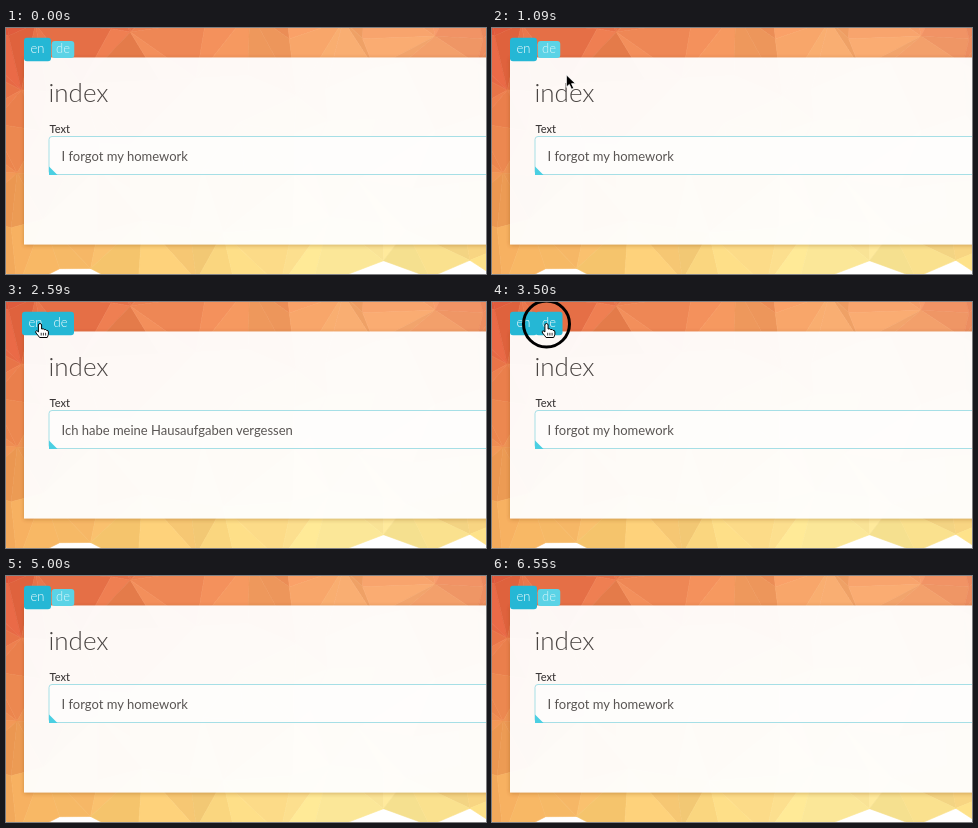
Animation of 480 by 246 pixels, one loop 6.6 s. Source, as an HTML page:

```html
<!DOCTYPE html>
<html lang="en">
<head>
<meta charset="utf-8">
<title>Language switch</title>
<style>
  html, body { margin: 0; width: 100%; height: 100%; overflow: hidden; }
  svg { display: block; width: 100vw; height: 100vh; font-family: Lato, "Open Sans", sans-serif; }
</style>
</head>
<body>
<svg viewBox="0 0 480 246" preserveAspectRatio="none">
  <defs>
    <filter id="shadow" x="-5%" y="-5%" width="110%" height="115%">
      <feDropShadow dx="0" dy="1" stdDeviation="2" flood-color="#7a3a10" flood-opacity=".35"/>
    </filter>
  </defs>
  <g id="facets"></g>
  <rect x="18" y="29.5" width="480" height="187" fill="#fff" filter="url(#shadow)" opacity=".95"/>
  <text x="42.5" y="74" font-size="26" font-weight="300" fill="#4a4543">index</text>
  <text x="43.5" y="105" font-size="11" font-weight="500" fill="#3c3838">Text</text>
  <rect x="43" y="108.5" width="460" height="38" rx="3" fill="#fff" fill-opacity=".6" stroke="#a6dfe6"/>
  <path d="M43 138.5V147H51.5Z" fill="#4bcfe2"/>
  <text id="sentence" x="55.5" y="133" font-size="13" fill="#595553"></text>
  <g id="tabs" font-size="13" font-weight="300" fill="#fff" text-anchor="middle"></g>
  <circle id="ring" r="23" fill="none" stroke="#000" stroke-width="3"/>
  <path id="arrow" d="M0 0V12.5L3 9.8L5.2 14.6L7.5 13.6L5.3 9H9.3Z" fill="#000" stroke="#fff" stroke-width=".9"/>
  <g id="hand" fill="#fff" stroke="#000" stroke-linejoin="round">
    <path d="M-1.6 8V1Q-1.4 -.5 0 -.5T1.6 1V5Q3.7 4.2 4.2 5.6Q6 5 6.5 6.4Q8.4 6 8.4 8V10.2Q8 12 7.2 13.5H-.4Q-2 11.2-4 9Q-5 7.2-3.5 6.8Q-2.4 7-1.6 8Z"/>
    <path d="M1.2 8.8V11.5M3.4 8.8V11.5M5.6 8.8V11.5" stroke-width=".8"/>
  </g>
</svg>
<script>
const LOOP = 6600;
const SVG = 'http://www.w3.org/2000/svg';
const byId = id => document.getElementById(id);
const sentences = { en: 'I forgot my homework', de: 'Ich habe meine Hausaufgaben vergessen' };

function add(parent, tag, attrs) {
  const node = parent.appendChild(document.createElementNS(SVG, tag));
  setAttrs(node, attrs);
  return node;
}
function setAttrs(node, attrs) {
  for (const name in attrs) node.setAttribute(name, attrs[name]);
}
const show = (node, visible) => node.setAttribute('visibility', visible ? 'visible' : 'hidden');

// Low-poly backdrop: a jittered grid coloured from two gradients.
const topStops = [[226, 92, 62], [233, 118, 76], [241, 143, 88], [245, 164, 106], [240, 143, 100]];
const bottomStops = [[247, 182, 97], [249, 204, 114], [251, 222, 134], [253, 242, 162], [249, 224, 134]];
const mix = (a, b, k) => a.map((v, i) => v + (b[i] - v) * k);
const clamp = v => Math.max(0, Math.min(1, v));
function sample(stops, k) {
  const p = clamp(k) * (stops.length - 1);
  const i = Math.min(Math.floor(p), stops.length - 2);
  return mix(stops[i], stops[i + 1], p - i);
}
let seed = 11;
const random = () => (seed = seed * 16807 % 2147483647) / 2147483647;

function drawFacets() {
  const cols = 13, rows = 7;
  const point = (c, r) => [(c - 1) * 46 + (random() - .5) * 34, (r - 1) * 50 + (random() - .5) * 36];
  const grid = Array.from({ length: rows }, (_, r) => Array.from({ length: cols }, (_, c) => point(c, r)));
  const facet = (...pts) => {
    const [x, y] = [0, 1].map(i => pts.reduce((sum, p) => sum + p[i], 0) / 3);
    const shade = (random() - .5) * 16;
    const base = mix(sample(topStops, x / 480), sample(bottomStops, x / 480), clamp(y / 246));
    const fill = `rgb(${base.map(v => Math.round(Math.min(255, v + shade)))})`;
    add(byId('facets'), 'polygon', { points: pts.join(' '), fill, stroke: fill, 'stroke-width': .6 });
  };
  for (let r = 0; r < rows - 1; r++) {
    for (let c = 0; c < cols - 1; c++) {
      const [a, b, d, e] = [grid[r][c], grid[r][c + 1], grid[r + 1][c], grid[r + 1][c + 1]];
      if ((r + c) % 2) { facet(a, b, e); facet(a, e, d); }
      else { facet(a, b, d); facet(b, e, d); }
    }
  }
}

const tabs = ['de', 'en'].map(lang => {
  const box = add(byId('tabs'), 'rect', { rx: 3 });
  const label = add(byId('tabs'), 'text', { y: 25 });
  label.textContent = lang;
  return { lang, box, label };
});

// Each click shows the ring and flips the language when it ends.
const clicks = [[1600, 1750], [2620, 2720], [3450, 3600], [4400, 4540]];

const easeOut = k => 1 - (1 - k) ** 2.2;
const easeIn = k => k ** 2.2;
const smooth = k => k * k * (3 - 2 * k);
const moves = [
  { start: 600, end: 1350, from: [260, 269], to: [54.5, 23], ease: easeOut },
  { start: 1950, end: 2200, to: [34, 22], ease: smooth },
  { start: 2850, end: 3150, to: [54.5, 22], ease: smooth },
  { start: 3800, end: 4050, to: [34, 24.5], ease: smooth },
  { start: 4620, end: 4960, to: [230, 270], ease: easeIn }
];

function cursorAt(t) {
  let pos = moves[0].from;
  for (const { start, end, to, ease } of moves) {
    if (t < start) break;
    pos = mix(pos, to, ease(clamp((t - start) / (end - start))));
  }
  return pos;
}

function drawTab({ lang, box, label }, selected, hovered) {
  const big = selected || hovered;
  const center = lang === 'en' ? (selected ? 31.5 : 29.5) : (selected ? 54.5 : 57);
  const [w, h] = big ? [27, 23.5] : [22.5, 17];
  setAttrs(box, {
    x: center - w / 2, y: 21.5 - h / 2, width: w, height: h,
    fill: big ? '#25b7d5' : '#5bd3e6'
  });
  setAttrs(label, { x: center, 'fill-opacity': big ? 1 : .8 });
}

function render(t) {
  const [x, y] = cursorAt(t);
  const selected = clicks.filter(([, end]) => t >= end).length % 2 ? 'de' : 'en';
  const overTabs = y < 33 && x > 16 && x < 71;
  const hovered = overTabs ? (x < 43 ? 'en' : 'de') : '';

  tabs.forEach(tab => drawTab(tab, tab.lang === selected, tab.lang === hovered));
  byId('sentence').textContent = sentences[selected];

  for (const id of ['arrow', 'hand', 'ring']) byId(id).setAttribute('transform', `translate(${x} ${y})`);
  show(byId('arrow'), !overTabs);
  show(byId('hand'), overTabs);
  show(byId('ring'), clicks.some(([start, end]) => t >= start && t < end));
}

drawFacets();
const origin = performance.now();
function tick() {
  render((performance.now() - origin) % LOOP);
  requestAnimationFrame(tick);
}
tick();
</script>
</body>
</html>
```
